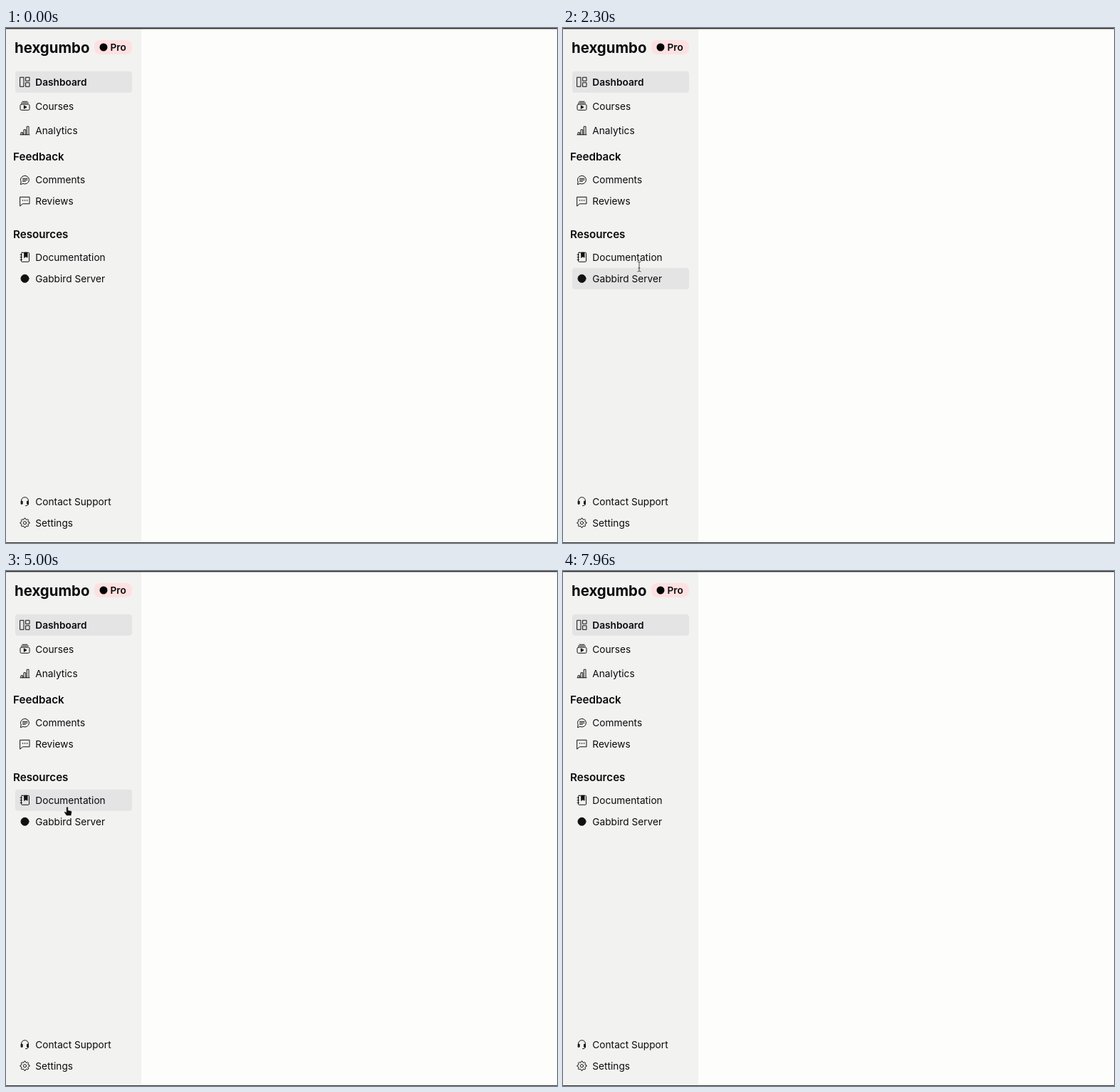
Animation, 774 px wide and 723 px high, one loop 8000 ms. Source, as an HTML page:

```html
<!DOCTYPE html>
<html lang="en">
<head>
<meta charset="utf-8">
<title>Sidebar hover</title>
<style>
  html, body { margin: 0; width: 100%; height: 100%; overflow: hidden; background: #fdfdfc; }
  svg { display: block; width: 100vw; height: 100vh; }
  text { font-family: Inter, sans-serif; font-size: 13.7px; fill: #0b0b0d; }
  .logo { font-size: 20.4px; font-weight: 700; }
  .heading { font-size: 15.2px; font-weight: 600; }
  .strong { font-weight: 600; }
  .icon { fill: none; stroke: #111; stroke-linejoin: round; stroke-linecap: round; }
  .icon .solid { fill: #111; }
  #beam { fill: none; stroke: #444; filter: drop-shadow(0 0 1px #fff); }
</style>
</head>
<body>
<svg viewBox="0 0 774 723">
  <rect width="774" height="723" fill="#fdfdfc"/>
  <rect width="190" height="723" fill="#f2f2f1"/>
  <rect width="774" height="1.4" fill="#2c2c2c"/>
  <rect y="722" width="774" height="1" fill="#34342c"/>
  <text class="logo" x="12" y="34.7">hexgumbo</text>
  <rect x="124" y="17" width="53" height="20" rx="8" fill="#fde1e1"/>
  <circle cx="137" cy="27" r="5.5" fill="#050505"/>
  <text class="strong" x="146.5" y="32">Pro</text>
  <g id="menu"></g>
  <g id="cursor">
    <path id="hand" d="M-1.3 1.2a1.3 1.3 0 0 1 2.6 0v3.6l4 1q1.3.4 1.1 1.8l-.8 5h-6.6l-3-4.4q-.8-1.5.8-1.5l1.9 1.1z"
      fill="#0a0a0a" stroke="#f4f4f4" stroke-width=".5"/>
    <path id="beam" d="M-2.5-7q2.5 0 2.5 1.5v11q0 1.5-2.5 1.5M2.5-7q-2.5 0-2.5 1.5M2.5 7q-2.5 0-2.5-1.5M-1.5 2h3"/>
    <path id="arrow" d="M0 0v13l3-2.8 2 4.8 2.2-.9-2-4.7h4.2z" fill="#0a0a0a" stroke="#fff" stroke-width=".8"/>
  </g>
</svg>
<script>
const LOOP = 8000, HOVER_LAG = 20, EXIT = 7130, RETURN = 7350, END = 7960;
const byId = id => document.getElementById(id);

const gear = Array.from({ length: 32 }, (_, i) => {
  const angle = (i - 0.5) * Math.PI / 16, radius = i % 4 < 2 ? 6.6 : 5;
  return [radius * Math.cos(angle), radius * Math.sin(angle)];
}).join(' ');

// Icons are drawn around their own centre.
const icons = {
  'Dashboard': '<path d="M-6.5-6.5h5v13h-5zM1.5-6.5h5v5h-5zM1.5 1h5v5.5h-5z"/>',
  'Courses': '<rect x="-6.5" y="-2.5" width="13" height="8" rx="1.5"/><path d="M-5-4.5h10M-3.5-6.5h7"/><path class="solid" d="M-1.2-.5v4l3.4-2z"/>',
  'Analytics': '<path d="M-6.5 6h13M-5.5 6v-3h2.5v3M-1.5 6v-7h2.7v7M2.7 6v-11.5h2.8v11.5"/>',
  'Comments': '<path d="M-6 6l.7-3.3a6 5.8 0 1 1 3 2.6zM-3-2h6.5M-3 0h6.5M-3 2h4"/>',
  'Reviews': '<path d="M-6.5-6h13v9.5h-9.5l-3.5 3z"/><path d="M-3-1.3h.2M0-1.3h.2M3-1.3h.2" stroke-width="1.5"/>',
  'Documentation': '<rect x="-5" y="-6.5" width="11" height="13" rx="1"/><path d="M-6.5-3.5h2.5M-6.5 0h2.5M-6.5 3.5h2.5"/><path class="solid" d="M-.5-6.5h4v7l-2-1.6-2 1.6z"/>',
  'Gabbird Server': '<circle class="solid" r="5.5"/>',
  'Contact Support': '<path d="M-5 1v-2a5 5 0 0 1 10 0v4q0 3-4 3"/><path class="solid" d="M-5-.5h1.6v4h-1.6zM3.4-.5h1.6v4h-1.6z"/>',
  'Settings': `<polygon points="${gear}"/><circle r="2.1"/>`
};

// Each group stacks its rows at a fixed step below the first row's middle.
const groups = [
  { middle: 75.75, step: 34, labels: ['Dashboard', 'Courses', 'Analytics'] },
  { middle: 213.3, step: 30, labels: ['Comments', 'Reviews'], heading: 'Feedback' },
  { middle: 321.75, step: 30, labels: ['Documentation', 'Gabbird Server'], heading: 'Resources' },
  { middle: 664.75, step: 30, labels: ['Contact Support', 'Settings'] }
];
const rows = groups.flatMap(({ middle, step, labels }) =>
  labels.map((label, i) => ({ label, middle: middle + i * step })));
const ROW_HEIGHT = 29.8;

byId('menu').innerHTML = groups.map(({ heading, middle }) =>
  heading ? `<text class="heading" x="10" y="${middle - 27.2}">${heading}</text>` : ''
).join('') + rows.map(({ label, middle }, i) => `
  <rect class="highlight" x="13" y="${middle - ROW_HEIGHT / 2}" width="164" height="${ROW_HEIGHT}" rx="4" fill="#e4e4e5"/>
  <g class="icon" transform="translate(26.5 ${middle})">${icons[label]}</g>
  <text x="41.3" y="${middle + 4.8}"${i ? '' : ' class="strong"'}>${label}</text>`
).join('');
const highlights = [...document.querySelectorAll('.highlight')];

// Turning points of the pointer's sweeps: [time, x, y].
const turns = [
  [40, 766, 4], [400, 120, 687], [870, 455, 45], [1130, 88, 660], [1597, 84, 205],
  [1945, 96, 660], [2500, 111, 206], [2700, 104, 340], [3000, 106, 22], [3300, 103, 238],
  [3600, 104, 58], [3960, 106, 135], [4700, 90, 343], [5000, 86, 331], [5500, 95, 668],
  [6150, 104, 704], [6802, 131, 226], [EXIT, 756, 350]
];

function pointerAt(time) {
  if (time >= RETURN) {
    const swing = Math.sin(Math.PI * (time - RETURN) / (END - RETURN));
    return [4 + 135 * swing, 22 - 12 * swing];
  }
  const next = Math.max(1, turns.findIndex(([at]) => at > time));
  const [from, x0, y0] = turns[next - 1], [to, x1, y1] = turns[next];
  const progress = Math.min(1, Math.max(0, (time - from) / (to - from)));
  const eased = (1 - Math.cos(Math.PI * progress)) / 2;
  return [x0 + (x1 - x0) * eased, y0 + (y1 - y0) * eased];
}

function rowAt([x, y]) {
  if (x < 13 || x > 177) return -1;
  return rows.findIndex(({ middle }) => Math.abs(y - middle) <= ROW_HEIGHT / 2);
}

function draw(time) {
  const visible = time >= turns[0][0] && time < EXIT || time >= RETURN && time < END;
  const hovered = visible ? rowAt(pointerAt(time - HOVER_LAG)) : -1;
  highlights.forEach((box, i) => box.setAttribute('visibility', i === 0 || i === hovered ? 'visible' : 'hidden'));

  byId('cursor').style.display = visible ? '' : 'none';
  if (!visible) return;
  const [x, y] = pointerAt(time).map(Math.round);
  byId('cursor').setAttribute('transform', `translate(${x} ${y})`);
  const kind = hovered < 0 ? 'arrow' : x > 106 ? 'beam' : 'hand';
  for (const id of ['hand', 'beam', 'arrow']) byId(id).style.display = id === kind ? '' : 'none';
}

const start = performance.now();
function tick() {
  draw((performance.now() - start) % LOOP);
  requestAnimationFrame(tick);
}
tick();
</script>
</body>
</html>
```
